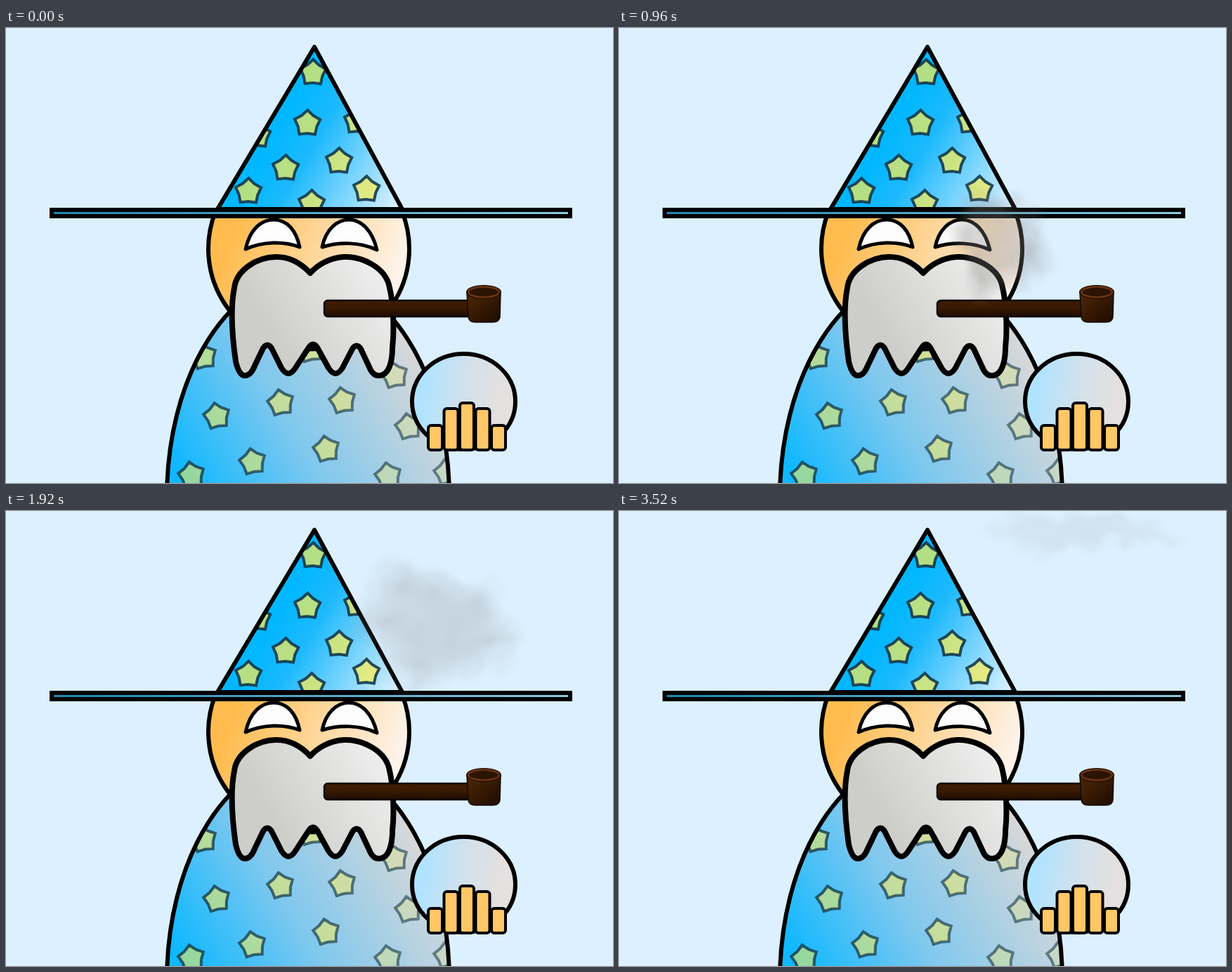
Write an HTML page that moves like this. It is 864 by 648 pixels and loops after 3840 ms.

```html
<!DOCTYPE html>
<html lang="en">
<head>
<meta charset="utf-8">
<title>Wizard with a pipe</title>
<style>
  html, body { margin: 0; width: 100%; height: 100%; overflow: hidden; background: #dcf0ff; }
  svg { display: block; width: 100%; height: 100%; }
  .ink { stroke: #000; stroke-width: 6; stroke-linejoin: round; }
</style>
</head>
<body>
<svg viewBox="0 0 864 648">
  <defs>
    <linearGradient id="robe" gradientUnits="userSpaceOnUse" x1="250" y1="635" x2="575" y2="448">
      <stop stop-color="#10b8ff"/><stop offset=".45" stop-color="#80c8ee"/><stop offset="1" stop-color="#d8d8d8"/>
    </linearGradient>
    <linearGradient id="hat" gradientUnits="userSpaceOnUse" x1="310" y1="100" x2="560" y2="245">
      <stop stop-color="#10b2f6"/><stop offset=".3" stop-color="#00b7ff"/>
      <stop offset=".5" stop-color="#1cb9fc"/><stop offset="1" stop-color="#d8f0ff"/>
    </linearGradient>
    <linearGradient id="brim"><stop stop-color="#1f86b0"/><stop offset="1" stop-color="#8cc8e0"/></linearGradient>
    <linearGradient id="skin" x1="0" y1=".4" x2="1" y2=".65">
      <stop offset=".05" stop-color="#ffbb4d"/><stop offset=".9" stop-color="#fdf3ea"/>
    </linearGradient>
    <linearGradient id="beard" x1=".2" y1=".55" x2="1" y2=".2">
      <stop stop-color="#cdcdca"/><stop offset="1" stop-color="#f0f0f0"/>
    </linearGradient>
    <linearGradient id="stem" x2="0" y2="1"><stop stop-color="#3f1d02"/><stop offset=".5" stop-color="#381902"/><stop offset="1" stop-color="#1c0b00"/></linearGradient>
    <linearGradient id="bowl" y2="1"><stop stop-color="#502806"/><stop offset="1" stop-color="#1c0b00"/></linearGradient>
    <linearGradient id="ball" x1=".1" y1=".5" x2=".85" y2=".6">
      <stop stop-color="#b0e3ff"/><stop offset=".5" stop-color="#d2e1ec"/><stop offset="1" stop-color="#e4e0df"/>
    </linearGradient>
    <linearGradient id="robeStar" gradientUnits="userSpaceOnUse" x1="260" x2="600" y1="0" y2="0">
      <stop stop-color="#fff050" stop-opacity=".55"/><stop offset=".6" stop-color="#fff050" stop-opacity=".5"/>
      <stop offset="1" stop-color="#d8e090" stop-opacity=".3"/>
    </linearGradient>
    <linearGradient id="robeStarEdge" gradientUnits="userSpaceOnUse" x1="260" x2="600" y1="0" y2="0">
      <stop stop-color="#103848" stop-opacity=".8"/><stop offset="1" stop-color="#103040" stop-opacity=".55"/>
    </linearGradient>
    <radialGradient id="puff">
      <stop stop-color="#7c7876"/><stop offset=".5" stop-color="#84827f" stop-opacity=".5"/>
      <stop offset="1" stop-color="#8c8c8c" stop-opacity="0"/>
    </radialGradient>
    <filter id="wisp" filterUnits="userSpaceOnUse" x="380" y="-60" width="484" height="520" color-interpolation-filters="sRGB">
      <feTurbulence type="fractalNoise" baseFrequency=".022" numOctaves="3" seed="4"/>
      <feDisplacementMap in="SourceGraphic" scale="46" xChannelSelector="R" yChannelSelector="G"/>
      <feGaussianBlur stdDeviation="3"/>
    </filter>
    <clipPath id="robeClip"><ellipse cx="430" cy="668" rx="201" ry="317"/></clipPath>
    <clipPath id="hatClip"><path d="M439 27 301 258H564Z"/></clipPath>
  </defs>

  <ellipse cx="430" cy="668" rx="201" ry="317" fill="url(#robe)"/>
  <g clip-path="url(#robeClip)"><path id="robeStars" fill="url(#robeStar)" stroke="url(#robeStarEdge)" stroke-width="4"/></g>
  <ellipse class="ink" cx="430" cy="668" rx="201" ry="317" fill="none"/>

  <path class="ink" d="M298 262A143 143 0 1 0 564 262Z" fill="url(#skin)"/>
  <g class="ink" fill="#fdfdfd" style="stroke-width:5">
    <path d="M341 315C347 286 364 273 381 273C400 273 413 288 418 312C395 303 365 304 341 315Z"/>
    <path d="M450 312C455 288 470 273 488 273C505 273 521 287 528 316C505 305 475 304 450 312Z"/>
  </g>

  <path d="M439 27 301 258H564Z" fill="url(#hat)"/>
  <g clip-path="url(#hatClip)"><path id="hatStars" fill="#fff050" fill-opacity=".7" stroke="#0c3046" stroke-opacity=".85" stroke-width="4"/></g>
  <path class="ink" d="M439 27 301 258H564Z" fill="none"/>
  <rect x="65" y="259" width="738" height="9" fill="url(#brim)" stroke="#000" stroke-width="6"/>

  <path class="ink" style="stroke-width:8" fill="url(#beard)" d="M433 349C420 335 405 326 385 326C357 326 328 345 325 370
    C319 400 322 440 327 475Q332 496 341 495Q349 494 354 481L366 456Q372 447 378 456L392 484Q402 500 412 484
    L431 455Q437 446 443 455L459 484Q469 500 479 484L493 457Q499 448 505 457L519 487Q524 496 532 495
    C545 494 550 475 550 455C553 430 551 390 546 370C541 340 505 325 481 326C460 327 443 338 433 349Z"/>

  <rect x="453" y="388" width="208" height="23" rx="5" fill="url(#stem)" stroke="#0c0808" stroke-width="2.5"/>
  <path d="M656 377 658 412Q659 419 668 419H693Q702 419 703 412L704 377Z" fill="url(#bowl)" stroke="#140800" stroke-width="1.5"/>
  <ellipse cx="680" cy="376" rx="24" ry="9" fill="#2c1402" stroke="#1c0a00" stroke-width="2"/>
  <ellipse cx="680" cy="376" rx="22" ry="7.5" fill="none" stroke="#6b3510" stroke-width="2.5"/>

  <ellipse class="ink" cx="651.5" cy="532" rx="73.5" ry="68" fill="url(#ball)"/>
  <g id="fingers" fill="#ffc766" stroke="#000" stroke-width="4"></g>

  <g id="smoke" filter="url(#wisp)"><g id="cloud" fill="url(#puff)"></g></g>
</svg>
<script>
const STEP_MS = 320, STEPS = 12, PUFFS = 9;
const byId = id => document.getElementById(id);

function starPath([x, y], tilt) {
  const points = Array.from({ length: 10 }, (_, i) => {
    const angle = (i * 36 - 90 + tilt) * Math.PI / 180, r = i % 2 ? 14 : 19;
    return `${x + r * Math.cos(angle)} ${y + r * Math.sin(angle)}`;
  });
  return `M${points.join('L')}Z`;
}

function drawStars(id, tilt, centres) {
  byId(id).setAttribute('d', centres.map(c => starPath(c, tilt)).join(''));
}

function repeat(count, draw) {
  return Array.from({ length: count }, (_, i) => draw(i)).join('');
}

drawStars('hatStars', 1, [[437, 64], [429, 136], [398, 200], [474, 190], [345, 233],
  [513, 230], [435, 250], [358, 153], [500, 133]]);
drawStars('robeStars', -10, [[300, 553], [391, 534], [479, 531], [456, 600], [351, 618], [264, 637],
  [544, 638], [573, 568], [553, 495], [281, 468], [433, 458], [628, 633]]);

// Five fingers, tallest in the middle.
byId('fingers').innerHTML = repeat(5, i => {
  const top = 534 + 8 * (i - 2) ** 2;
  return `<rect x="${601 + 22.5 * i}" y="${top}" width="20" height="${601 - top}" rx="4"/>`;
});

// A cloud of unit size: puffs spread evenly over a disc on a golden-angle spiral.
byId('cloud').innerHTML = repeat(PUFFS, i => {
  const angle = i * 2.4, r = 0.72 * Math.sqrt((i + 0.5) / PUFFS);
  return `<circle cx="${r * Math.cos(angle)}" cy="${r * Math.sin(angle)}" r=".5"/>`;
});

// The cloud rises from the mouth, widens, then flattens out at the top.
function moveSmoke(step) {
  const age = Math.min(step / 10, 1);
  const drift = Math.sin(age * Math.PI / 2);
  const x = 445 + 200 * drift;
  const y = 395 - 365 * age + 20 * Math.sin(2 * Math.PI * age);
  const width = 20 + 125 * drift;
  const height = 30 + 65 * Math.sin(Math.PI * age);
  byId('cloud').setAttribute('transform', `translate(${x} ${y}) scale(${width} ${height})`);
  byId('smoke').setAttribute('opacity', step ? 0.5 - 0.38 * age : 0);
}

function tick() {
  moveSmoke(Math.floor(performance.now() / STEP_MS) % STEPS);
  requestAnimationFrame(tick);
}
tick();
</script>
</body>
</html>
```
